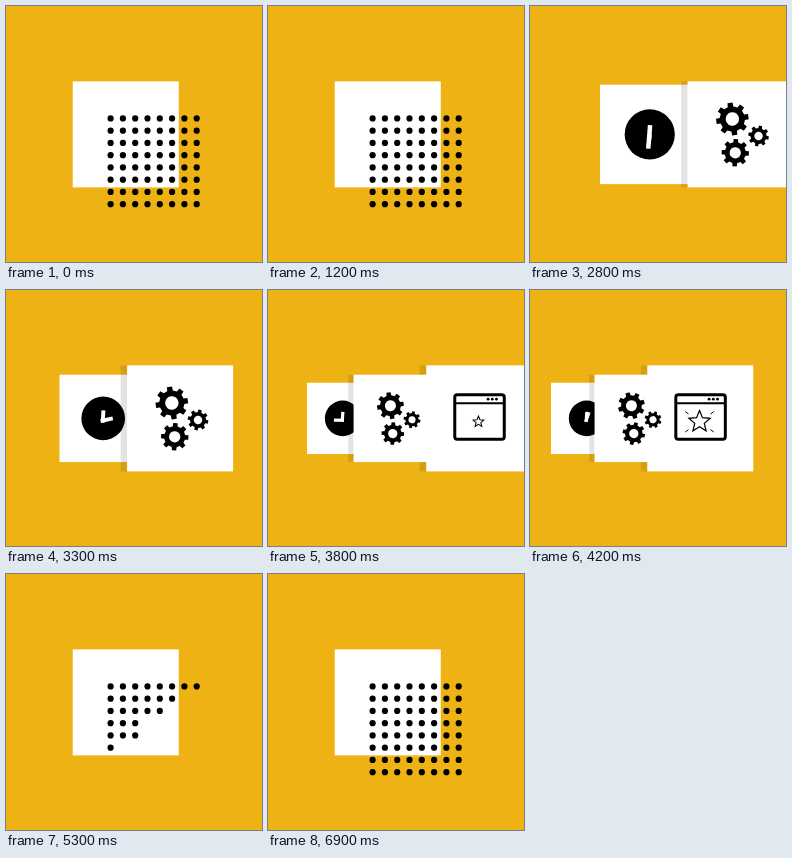
Animation of 256x256 px, one loop 8000 ms. Source, as an HTML page with a canvas:

```html
<!DOCTYPE html>
<html lang="en">
<head>
<meta charset="utf-8">
<title>Sliding cards</title>
<style>
  html, body { margin: 0; width: 100%; height: 100%; overflow: hidden; background: #efb215; }
  canvas { display: block; width: 100vmin; height: 100vmin; }
</style>
</head>
<body>
<canvas id="stage"></canvas>
<script>
const LOOP = 8000, STEP = 100;
const SIZE = 106, CX = 119.75, CY = 128.4;
const YELLOW = '#efb215', BLACK = '#000', WHITE = '#fff';
const canvas = document.getElementById('stage');
const ctx = canvas.getContext('2d');

// Smooth step from 0 to 1 between two times.
function ramp(t, from, to) {
  const u = Math.min(1, Math.max(0, (t - from) / (to - from)));
  return u * u * (3 - 2 * u);
}

// Distance still to go for a card that rushes in from the right.
const rushIn = (t, start) => 159 * Math.exp((start - t) / 110);

const polar = (r, angle) => [r * Math.cos(angle), r * Math.sin(angle)];

// Each new card pushes the earlier ones back while all drift left.
function poses(t) {
  const first = ramp(t, 2600, 3100), second = ramp(t, 3300, 3800);
  const exit = 200 * ramp(t, 4600, 5200);
  return {
    clock: {
      x: CX - .0451 * Math.max(0, t - 2800) - exit,
      scale: 1 - .176 * first - .152 * second
    },
    gears: {
      x: CX + .0525 * (3981 - t) + 18.5 * (1 - second) + rushIn(t, 2500) - exit,
      scale: 1 - .176 * second
    },
    browser: {
      x: CX + .05 * Math.max(0, 5200 - t) + rushIn(t, 3580),
      scale: 1
    }
  };
}

function place(pose, paint) {
  ctx.save();
  ctx.translate(pose.x, CY);
  ctx.scale(pose.scale, pose.scale);
  paint();
  ctx.restore();
}

function panel(shadow) {
  const half = SIZE / 2;
  ctx.fillStyle = `rgba(0,0,0,${shadow})`;
  ctx.fillRect(-half - 6.5, -half, 6.5, SIZE);
  ctx.fillStyle = WHITE;
  ctx.fillRect(-half, -half, SIZE, SIZE);
}

function disc(x, y, r, color = BLACK) {
  ctx.fillStyle = color;
  ctx.beginPath();
  ctx.arc(x, y, r, 0, Math.PI * 2);
  ctx.fill();
}

function line(x0, y0, x1, y1, width, color = BLACK) {
  ctx.strokeStyle = color;
  ctx.lineWidth = width;
  ctx.beginPath();
  ctx.moveTo(x0, y0);
  ctx.lineTo(x1, y1);
  ctx.stroke();
}

function clock(t) {
  const age = t - 2000;
  if (age < 0) return;
  const r = 26.5 * (1 - Math.exp(-age / 200) * Math.cos(age * Math.PI / 600));
  const s = (t - 2800) / 1000;
  const hand = (degrees, length) => {
    ctx.save();
    ctx.rotate(degrees * Math.PI / 180);
    line(0, r * .09, 0, -length * r, r * .18, WHITE);
    ctx.restore();
  };
  disc(0, 0, r);
  ctx.save();
  ctx.translate(-r * .02, r * .1);
  hand(4, .47);
  hand(185 + 567 * s - 122 * s * s, .47);
  ctx.restore();
}

function gear(x, y, r, angle) {
  const teeth = 8, pitch = Math.PI * 2 / teeth, root = r * .77;
  ctx.save();
  ctx.translate(x, y);
  ctx.rotate(angle);
  ctx.fillStyle = BLACK;
  ctx.beginPath();
  for (let i = 0; i < teeth; i++) {
    const a = i * pitch;
    ctx.lineTo(...polar(root, a - pitch * .29));
    ctx.lineTo(...polar(r, a - pitch * .2));
    ctx.lineTo(...polar(r, a + pitch * .2));
    ctx.lineTo(...polar(root, a + pitch * .29));
  }
  ctx.fill();
  disc(0, 0, r * .41, WHITE);
  ctx.restore();
}

function gears(t) {
  const turn = (t - 2800) / 1000 * Math.PI / 2;
  gear(-8.3, -15.4, 16.4, turn + .64);
  gear(-5.4, 18.4, 13.8, -turn + .05);
  gear(17.9, 1.6, 10.4, -turn + .2);
}

function star(t) {
  const r = 11.2 * ramp(t, 3500, 4100), ray = 4 * ramp(t, 3900, 4200);
  ctx.save();
  ctx.translate(-.8, 3.4);
  ctx.strokeStyle = BLACK;
  ctx.lineWidth = .8 + r * .04;
  ctx.beginPath();
  for (let i = 0; i < 10; i++) {
    ctx.lineTo(...polar(i % 2 ? r * .45 : r, (i * 36 - 90) * Math.PI / 180));
  }
  ctx.closePath();
  ctx.stroke();
  for (let i = 0; i < 4; i++) {
    const a = (i >> 1) * Math.PI + (i % 2 ? .62 : -.62);
    line(...polar(13.5, a), ...polar(13.5 + ray, a), 1);
  }
  ctx.restore();
}

function browser(t) {
  const s = 1 - ramp(t, 4700, 5200);
  if (s <= 0) return;
  ctx.scale(s, s);
  ctx.strokeStyle = BLACK;
  ctx.lineWidth = 3;
  ctx.beginPath();
  ctx.roundRect(-24.5, -23.7, 49.5, 44.5, 2.5);
  ctx.stroke();
  line(-24.5, -15.2, 25, -15.2, 2);
  for (let i = 0; i < 3; i++) disc(8.8 + i * 4.2, -19.2, 1.4);
  star(t);
}

// A diagonal wipe with uneven steps: each row waits one extra turn per set bit.
function dots(t) {
  const shown = t >= 5300 ? 8 + (t - 5300) / 20 : 99;
  const hidden = t < 5300 ? 6 + (t - 1700) * .06 : 0;
  for (let row = 0; row < 8; row++) {
    const delay = row + (row & 1) + (row >> 1 & 1) + (row >> 2);
    for (let col = 0; col < 8; col++) {
      const order = col + delay;
      if (order < shown && order >= hidden) disc(104.6 + col * 12.3, 112.4 + row * 12.25, 3.1);
    }
  }
}

function draw(t) {
  const k = canvas.width / 256, pose = poses(t);
  const shadow = .11 * (1 - ramp(t, 4900, 5200));
  ctx.setTransform(k, 0, 0, k, 0, 0);
  ctx.fillStyle = YELLOW;
  ctx.fillRect(0, 0, 256, 256);
  place(pose.clock, () => { panel(0); clock(t); });
  place(pose.browser, () => panel(shadow));
  place(pose.gears, () => { panel(shadow); gears(t); });
  place(pose.browser, () => browser(t));
  dots(t);
}

function resize() {
  const side = Math.min(innerWidth, innerHeight) || 256;
  canvas.width = canvas.height = Math.round(side * (devicePixelRatio || 1));
}

const start = performance.now();
function tick() {
  const t = Math.max(0, performance.now() - start) % LOOP;
  draw(Math.floor(t / STEP) * STEP);
  requestAnimationFrame(tick);
}

addEventListener('resize', resize);
resize();
tick();
</script>
</body>
</html>
```
